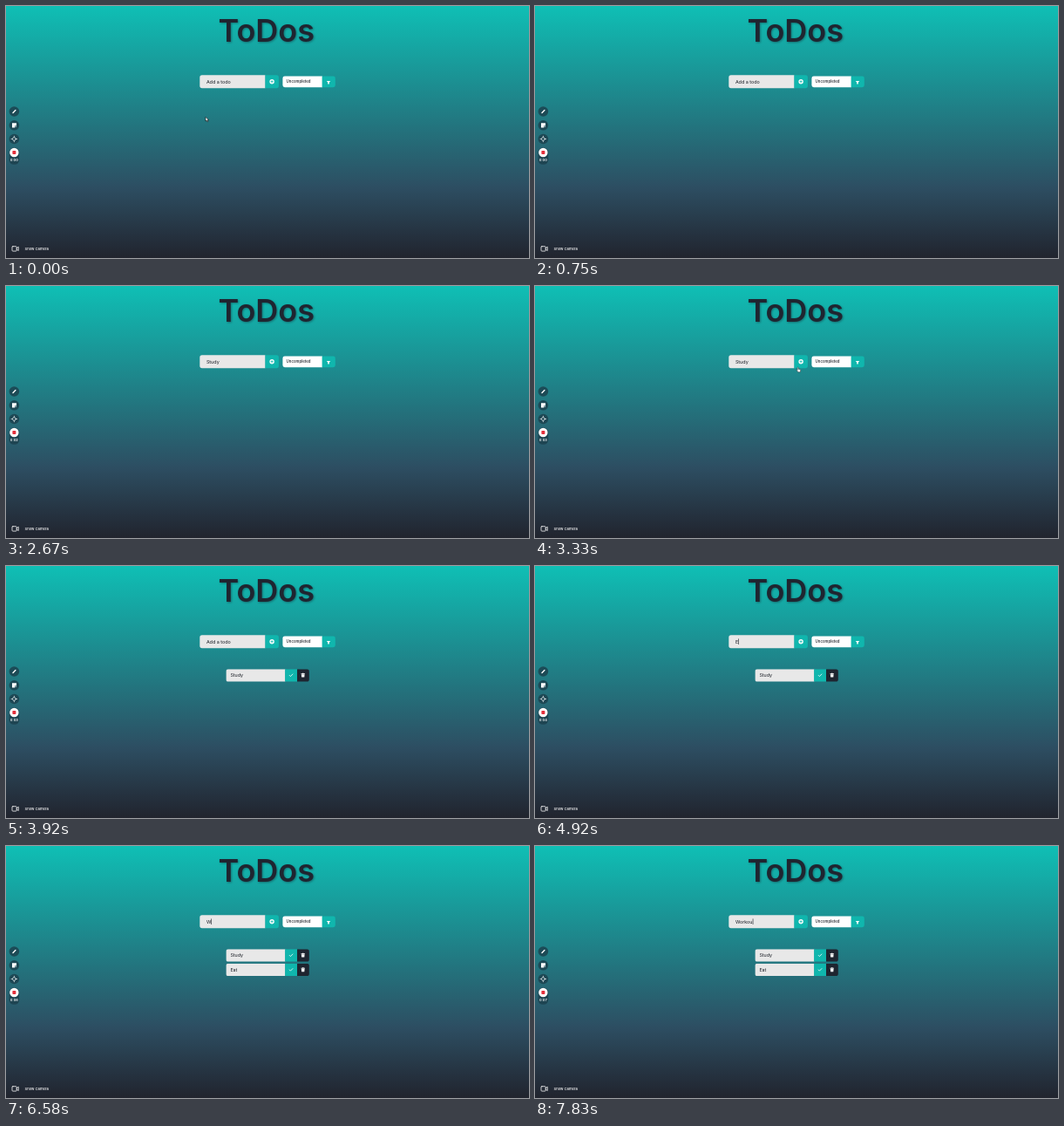
An HTML page for the animation above (8 s loop, 600x289 px).

```html
<!DOCTYPE html>
<html lang="en">
<head>
<meta charset="utf-8">
<title>ToDos</title>
<style>
  html, body { margin: 0; width: 100%; height: 100%; overflow: hidden; background: #21242f; }
  svg { display: block; width: 100vw; height: 100vh; }
  text { font-family: Inter, "Open Sans", sans-serif; font-size: 5.4px; fill: #161a22; }
  #title { font-size: 36px; font-weight: 600; fill: #1f2530; filter: drop-shadow(1.6px 1.8px 1px rgba(20, 40, 50, .45)); }
  .white { fill: #fff; }
  .line { fill: none; stroke: #fff; stroke-linecap: round; stroke-linejoin: round; }
</style>
</head>
<body>
<svg viewBox="0 0 600 289">
  <defs>
    <linearGradient id="sky" x2="0" y2="1">
      <stop stop-color="#0fbfb5"/>
      <stop offset=".72" stop-color="#2d4e62"/>
      <stop offset="1" stop-color="#21242e"/>
    </linearGradient>
    <clipPath id="inputClip"><rect x="222.3" y="79.2" width="90.6" height="15" rx="2.6"/></clipPath>
    <clipPath id="selectClip"><rect x="317.4" y="80.5" width="60.4" height="12.7" rx="2.4"/></clipPath>
    <clipPath id="itemClip"><rect width="95.4" height="14.3" rx="2.6"/></clipPath>
  </defs>
  <rect width="600" height="289" fill="url(#sky)"/>
  <text id="title" x="243.5" y="41">ToDos</text>

  <g clip-path="url(#inputClip)">
    <path fill="#e8e8e8" d="M222 79h75.5v16H222z"/>
    <path fill="#10b6ad" d="M297.5 79H313v16h-15.5z"/>
  </g>
  <circle class="white" cx="305.1" cy="86.7" r="2.7"/>
  <path d="M303.6 86.7h3M305.1 85.2v3" stroke="#10b6ad" stroke-width=".8"/>
  <text id="entry" x="229.9" y="88.6"></text>
  <path id="squiggle" fill="none" stroke="#b9474b" stroke-width=".45" d="M230 89.9q.5-.8 1 0t1 0 1 0 1 0 1 0 1 0 1 0 1 0"/>
  <rect id="caret" y="83.4" width=".6" height="6.6" fill="#161a22"/>

  <g clip-path="url(#selectClip)">
    <path class="white" d="M317 80h46v14h-46z"/>
    <path fill="#10b6ad" d="M362.6 80H378v14h-15.4z"/>
  </g>
  <text x="321.6" y="88.4" style="font-size:4.35px;font-weight:500">Uncompleted</text>
  <path class="white" d="M367.7 85.9h4.6l-1.5 1.7v1.9h-1.6v-1.9z"/>

  <g id="items"></g>

  <g fill="#1c3f4b" fill-opacity=".8">
    <circle cx="9.4" cy="121" r="5.8"/>
    <circle cx="9.4" cy="136.8" r="5.8"/>
    <circle cx="9.4" cy="152.5" r="5.8"/>
    <rect x="3.6" y="162.4" width="11.6" height="19.4" rx="5.2"/>
  </g>
  <path class="line" stroke-width="1.4" d="M8 122.5l2.9-2.9"/>
  <path class="white" d="M7 134.2h5v3.2h-2v2H7zM10.6 138h1.4l-1.4 1.4z"/>
  <circle class="line" cx="9.4" cy="152.5" r="1.9" stroke-width=".65"/>
  <path class="line" stroke-width=".65" d="M9.4 149.2v1M9.4 154.8v1M6.1 152.5h1M11.7 152.5h1"/>
  <circle class="white" cx="9.4" cy="168" r="5.2"/>
  <rect x="7.4" y="166" width="4" height="4" rx=".7" fill="#e5303c"/>
  <text id="timer" class="white" x="9.3" y="178" text-anchor="middle" style="font-size:4px;font-weight:600"></text>
  <path class="line" stroke-width=".75" d="M7.9 275.7h3.4q.9 0 .9.9v3.6q0 .9-.9.9H7.9q-.9 0-.9-.9v-3.6q0-.9.9-.9zM12.2 277.6l2.1-1.3v4.2l-2.1-1.3"/>
  <text class="white" x="21.6" y="280" style="font-size:4.1px;font-weight:500">Show Camera</text>

  <path id="arrow" class="white" stroke="#111" stroke-width=".6" stroke-linejoin="round" d="M0 0v4.8l1.1-1 .8 1.8.9-.4-.8-1.7h1.5z"/>
  <path id="hand" class="white" stroke="#222" stroke-width=".45" stroke-linejoin="round" d="M-.5.2q.5-.6 1 0v1.9l2 .5q.6.2.5.9l-.4 2.1H.2L-1.5 3.2q.1-.7.7-.3l.3.3z"/>
</svg>
<script>
const LOOP = 8000;
const $ = id => document.getElementById(id);

// Field contents by time; an empty value shows the placeholder.
const typing = [
  [0, ""], [1170, "S"], [1500, "St"], [1670, "Stu"], [1920, "Stud"], [2080, "Study"],
  [3420, ""], [4920, "E"], [5080, "Ea"], [5420, "Eat"],
  [5830, ""], [6580, "W"], [7000, "Wo"], [7170, "Wor"], [7330, "Work"], [7500, "Worko"], [7670, "Workou"]
];
const caretSpans = [
  [330, 750], [1170, 2670], [3170, 3330], [4170, 4330], [4920, 5750], [6250, LOOP]
];
// Pointer trips: start, end, from x, y, to x, y, time of hiding.
const trips = [
  [3170, 3330, 270, 91, 301.7, 93.2, 3580],
  [5420, 5660, 280, 91, 300.9, 90.2, 5920]
];

const makeItem = (label, y, since) => {
  $("items").insertAdjacentHTML("beforeend", `
    <g transform="translate(252.4 ${y})">
      <g clip-path="url(#itemClip)">
        <path fill="#e8e8e8" d="M0 0h68v15H0z"/>
        <path fill="#10b6ad" d="M67.8 0h14v15h-14z"/>
        <path fill="#1f2530" d="M81.6 0H96v15H81.6z"/>
      </g>
      <text x="5" y="9" style="font-size:5.3px">${label}</text>
      <path class="line" stroke-width=".8" d="M72.8 7.2l1.2 1.2 2.5-2.6"/>
      <path class="white" d="M86.1 5h1.3l.3-.5h1.2l.3.5h1.3v.7h-4.4zM86.4 6h3.8l-.3 3.4h-3.2z"/>
    </g>`);
  return { node: $("items").lastElementChild, since };
};
const items = [makeItem("Study", 118.2, 3420), makeItem("Eat", 134.8, 5830)];

const show = (node, on) => node.setAttribute("visibility", on ? "visible" : "hidden");
const place = (node, x, y) => node.setAttribute("transform", `translate(${x} ${y})`);
const ease = p => p * p * (3 - 2 * p);

function draw(t) {
  const typed = typing.findLast(([at]) => at <= t)[1];
  const entry = $("entry");
  entry.textContent = typed || "Add a todo";
  const end = typed ? entry.getComputedTextLength() : 0;
  $("caret").setAttribute("x", 230.1 + end);
  show($("caret"), caretSpans.some(([a, b]) => t >= a && t < b));
  show($("squiggle"), typed === "Eat");

  items.forEach(({ node, since }) => show(node, t >= since));
  $("timer").textContent = "0:0" + Math.floor(t / 1000);

  place($("arrow"), 229, 127.3);
  show($("arrow"), t < 80);
  const trip = trips.find(([a, , , , , , hide]) => t >= a && t < hide);
  let onButton = false;
  if (trip) {
    const [a, b, x0, y0, x1, y1] = trip;
    const p = ease(Math.min(1, (t - a) / (b - a)));
    const x = x0 + (x1 - x0) * p;
    place($("hand"), x, y0 + (y1 - y0) * p);
    onButton = x > 297.5;
  }
  show($("hand"), onButton);
}

const start = performance.now();
function tick(now) {
  draw(Math.max(0, now - start) % LOOP);
  requestAnimationFrame(tick);
}
draw(0);
requestAnimationFrame(tick);
</script>
</body>
</html>
```
